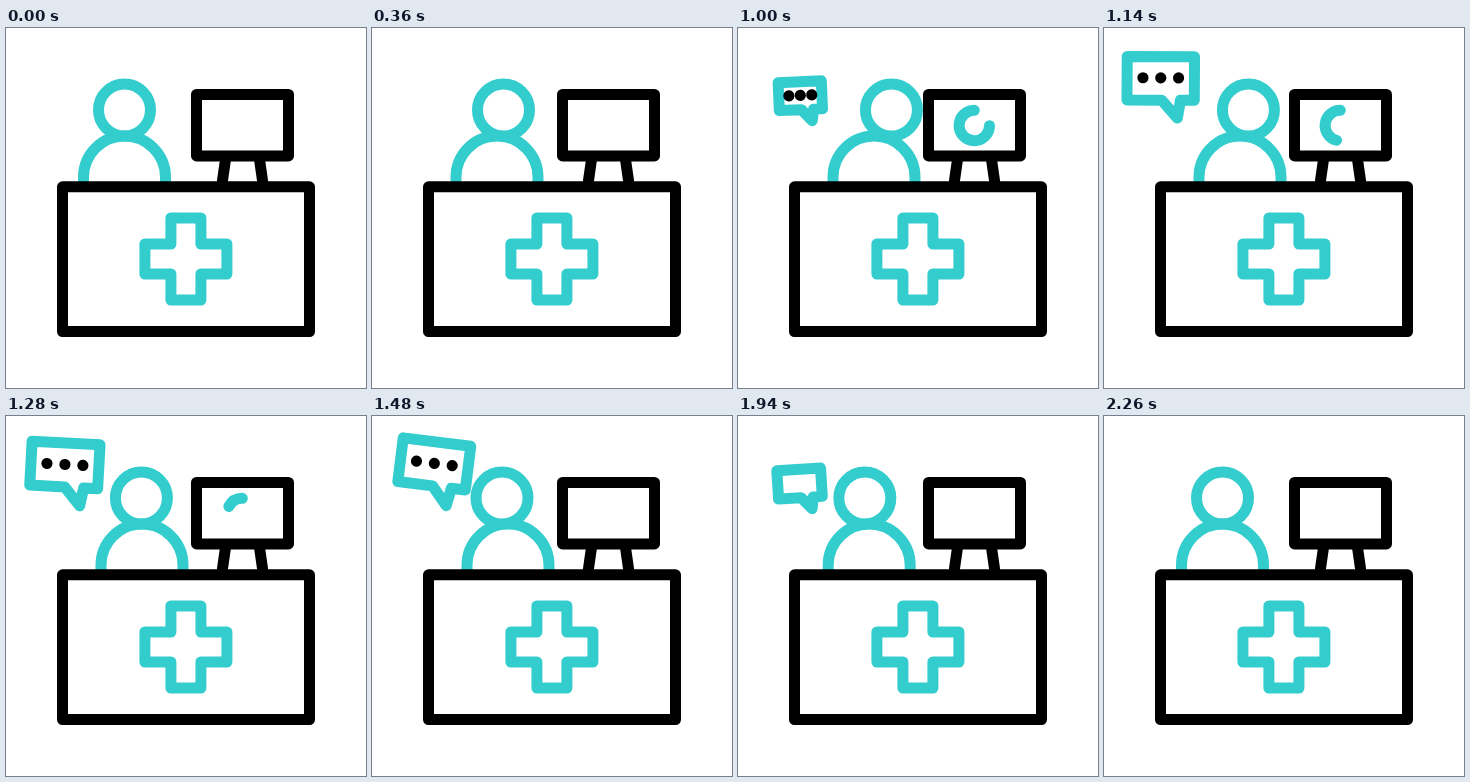
These frames come from a looping animation (360x360 px, 2.4 s). An HTML page:

```html
<!DOCTYPE html>
<html lang="en">
<head>
<meta charset="utf-8">
<title>Reception desk</title>
<style>
  html, body { margin: 0; width: 100%; height: 100%; overflow: hidden; background: #fff; }
  svg { display: block; width: 100vw; height: 100vh; }
  .line { fill: none; stroke-width: 11; stroke-linejoin: round; }
  .teal { stroke: #34cdce; }
  .ink { stroke: #000; }
</style>
</head>
<body>
<svg viewBox="0 0 360 360">
  <g id="bubble">
    <path id="outline" class="line teal" d="M-54-69h68v44h-14l-3 18l-16-18h-35z"/>
    <circle cx="-38" cy="-47.5"/>
    <circle cx="-20" cy="-47.5"/>
    <circle cx="-2" cy="-47.5"/>
  </g>
  <path id="body" class="line teal" d="M-41 156v-7a41 41 0 0 1 82 0v7"/>
  <circle id="head" class="line teal" cy="82" r="26"/>
  <path class="line ink" d="M220 128l-4 28M253 128l4 28"/>
  <rect class="line ink" x="190.5" y="66.5" width="92" height="61.4"/>
  <path id="loader" class="line teal" stroke-linecap="round"/>
  <rect class="line ink" x="56.5" y="158.8" width="247" height="144.7"/>
  <path class="line teal" d="M164.9 190h30v26h26v30h-26v26h-30v-26h-26v-30h26z"/>
</svg>
<script>
const LOOP = 2400;
const get = id => document.getElementById(id);
const bubble = get('bubble'), outline = get('outline'), loader = get('loader');
const dots = bubble.querySelectorAll('circle');

// Progress from 0 to 1 between two times.
const ramp = (t, start, end) => Math.min(1, Math.max(0, (t - start) / (end - start)));
const show = (node, visible) => node.style.display = visible ? '' : 'none';

function drawPerson(t) {
  const lean = ramp(t, 220, 600), ease = ramp(t, 1000, 1365), back = 1 - ramp(t, 1820, 2260);
  get('body').setAttribute('transform', `translate(${118.5 + 17.5 * lean * back})`);
  get('head').setAttribute('cx', 118.5 + (35 * lean - 23.5 * ease) * back);
}

// The bubble scales and swings about its tail; line weight and dot size stay constant.
function drawBubble(t) {
  const size = ramp(t, 750, 1145) - ramp(t, 1820, 2160);
  show(bubble, size > 0);
  if (size <= 0) return;
  const swing = ramp(t, 750, 1500) - ramp(t, 1500, 1700) + ramp(t, 1700, 2160) / 2;
  const tilt = 15 * (swing - 0.5);
  bubble.setAttribute('transform', `translate(76.3 97) rotate(${tilt}) scale(${size})`);
  outline.style.strokeWidth = 11 / size;
  dots.forEach((dot, i) => {
    const delay = 35 * i;
    const grown = ramp(t - delay, 860, 920) - ramp(t - delay, 1760, 1820);
    dot.setAttribute('r', 5.6 * grown / size);
  });
}

function drawLoader(t) {
  const from = 270 * ramp(t, 1000, 1365);
  const to = Math.max(270 * ramp(t, 615, 1000), from + 0.1);
  show(loader, t >= 605 && t < 1365);
  const point = deg => {
    const a = deg * Math.PI / 180;
    return [236.3 + 15.2 * Math.cos(a), 97.5 + 15.2 * Math.sin(a)];
  };
  loader.setAttribute('d', `M${point(from)}A15.2 15.2 0 ${to - from > 180 ? 1 : 0} 1 ${point(to)}`);
}

function draw(t) {
  drawPerson(t);
  drawBubble(t);
  drawLoader(t);
}

const began = performance.now();
function tick() {
  draw((performance.now() - began) % LOOP);
  requestAnimationFrame(tick);
}
draw(0);
requestAnimationFrame(tick);
</script>
</body>
</html>
```
